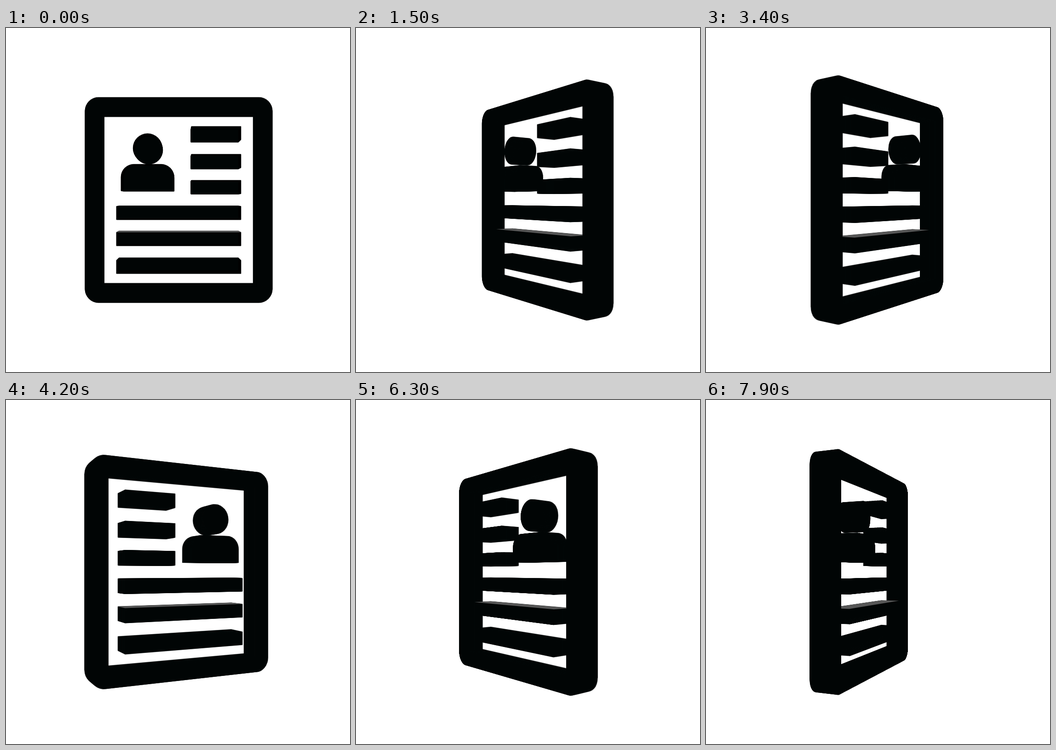
An HTML page without scripts that plays this animation: 748 by 748 pixels, repeating every 8000 ms.

```html
<!DOCTYPE html>
<html lang="en">
<head>
<meta charset="utf-8">
<title>Turning profile card</title>
<style>
@property --turn { syntax: "<angle>"; inherits: true; initial-value: 0deg; }

html, body { margin: 0; width: 100%; height: 100%; overflow: hidden; background: #fff; }

.stage {
  --ink: #010505;
  --depth: 46px;
  position: relative;
  width: 748px;
  height: 748px;
  overflow: hidden;
  animation: turn 8s infinite;
}

/* Ten pictures a second */
@keyframes turn {
  0%      { --turn: 0deg;     animation-timing-function: steps(9); }
  11.25%  { --turn: 32.7deg;  animation-timing-function: steps(9); }
  22.5%   { --turn: 64.8deg;  animation-timing-function: steps(7); }
  31.25%  { --turn: 94.4deg;  animation-timing-function: steps(9); }
  42.5%   { --turn: 127deg;   animation-timing-function: steps(11); }
  56.25%  { --turn: 165deg;   animation-timing-function: steps(6); }
  63.75%  { --turn: 186.6deg; animation-timing-function: steps(12); }
  78.75%  { --turn: 230.3deg; animation-timing-function: steps(16); }
  98.75%  { --turn: 292.9deg; animation-timing-function: steps(1); }
  100%    { --turn: 296.6deg; }
}

/* Every part is a flat plane placed around the same upright axis */
.stage > * {
  position: absolute;
  inset: 0;
  margin: auto;
  transform:
    perspective(1000px)
    rotateY(calc(var(--turn) * -1))
    translate3d(calc(1.5px + var(--x, 0px)), var(--y, 0px), calc(var(--z, 0px) - 2.6px))
    var(--face, rotateY(0deg));
}

svg { width: 420px; height: 460px; fill: var(--ink); fill-rule: evenodd; }
.slice { --z: calc(var(--depth) / -24 * var(--i)); }

.shelf {
  --y: 70.4px;
  --z: calc(var(--depth) / -2);
  --face: rotateX(90deg);
  width: 272px;
  height: var(--depth);
  background: #575757;
}

.rim, .side { backface-visibility: hidden; }
.back { --z: calc(var(--depth) * -1); --face: rotateY(180deg); }

.side {
  --z: calc(var(--depth) / -2);
  --face: rotateY(90deg);
  width: var(--depth);
  height: var(--h);
  background: var(--ink);
}
.left { --face: rotateY(-90deg); }
.s1 { --x: 174.5px; --h: 448px; }
.s2 { --x: 190px;   --h: 439.4px; }
.s3 { --x: 199px;   --h: 422px; }
.s4 { --x: 204.5px; --h: 388px; }
.left.s1 { --x: -174.5px; }
.left.s2 { --x: -190px; }
.left.s3 { --x: -199px; }
.left.s4 { --x: -204.5px; }
</style>
</head>
<body>
<svg style="position:absolute;width:0;height:0" aria-hidden="true">
  <symbol id="rim" viewBox="-210 -230 420 460">
    <path d="M-174.5-224h349a30 30 0 0 1 30 30v388a30 30 0 0 1-30 30h-349a30 30 0 0 1-30-30v-388a30 30 0 0 1 30-30z
             M-169.5-189.5v379h339v-379z"/>
  </symbol>
  <symbol id="card" viewBox="-210 -230 420 460">
    <use href="#rim" x="-210" y="-230" width="420" height="460"/>
    <circle cx="-68" cy="-113.3" r="31.7"/>
    <path d="M-126-20v-30a28 28 0 0 1 28-28h59.6a28 28 0 0 1 28 28v30z"/>
    <path d="M27.6-160.8h108.4v29.4h-108.4z M27.6-100h108.4v29.6h-108.4z M27.6-43h108.4v29.4h-108.4z"/>
    <path d="M-136 13.6h272v29.4h-272z M-136 70.4h272v29.6h-272z M-136 131.4h272v29.4h-272z"/>
  </symbol>
</svg>

<div class="stage">
  <svg class="slice" style="--i:0"><use href="#card"/></svg>
  <svg class="slice" style="--i:1"><use href="#card"/></svg>
  <svg class="slice" style="--i:2"><use href="#card"/></svg>
  <svg class="slice" style="--i:3"><use href="#card"/></svg>
  <svg class="slice" style="--i:4"><use href="#card"/></svg>
  <svg class="slice" style="--i:5"><use href="#card"/></svg>
  <svg class="slice" style="--i:6"><use href="#card"/></svg>
  <svg class="slice" style="--i:7"><use href="#card"/></svg>
  <svg class="slice" style="--i:8"><use href="#card"/></svg>
  <svg class="slice" style="--i:9"><use href="#card"/></svg>
  <svg class="slice" style="--i:10"><use href="#card"/></svg>
  <svg class="slice" style="--i:11"><use href="#card"/></svg>
  <svg class="slice" style="--i:12"><use href="#card"/></svg>
  <svg class="slice" style="--i:13"><use href="#card"/></svg>
  <svg class="slice" style="--i:14"><use href="#card"/></svg>
  <svg class="slice" style="--i:15"><use href="#card"/></svg>
  <svg class="slice" style="--i:16"><use href="#card"/></svg>
  <svg class="slice" style="--i:17"><use href="#card"/></svg>
  <svg class="slice" style="--i:18"><use href="#card"/></svg>
  <svg class="slice" style="--i:19"><use href="#card"/></svg>
  <svg class="slice" style="--i:20"><use href="#card"/></svg>
  <svg class="slice" style="--i:21"><use href="#card"/></svg>
  <svg class="slice" style="--i:22"><use href="#card"/></svg>
  <svg class="slice" style="--i:23"><use href="#card"/></svg>
  <svg class="slice" style="--i:24"><use href="#card"/></svg>

  <div class="shelf"></div>

  <!-- Nearest faces, painted over the shelf -->
  <svg class="rim"><use href="#rim"/></svg>
  <svg class="rim back"><use href="#rim"/></svg>
  <div class="side s1"></div>
  <div class="side s2"></div>
  <div class="side s3"></div>
  <div class="side s4"></div>
  <div class="side left s1"></div>
  <div class="side left s2"></div>
  <div class="side left s3"></div>
  <div class="side left s4"></div>
</div>
</body>
</html>
```
